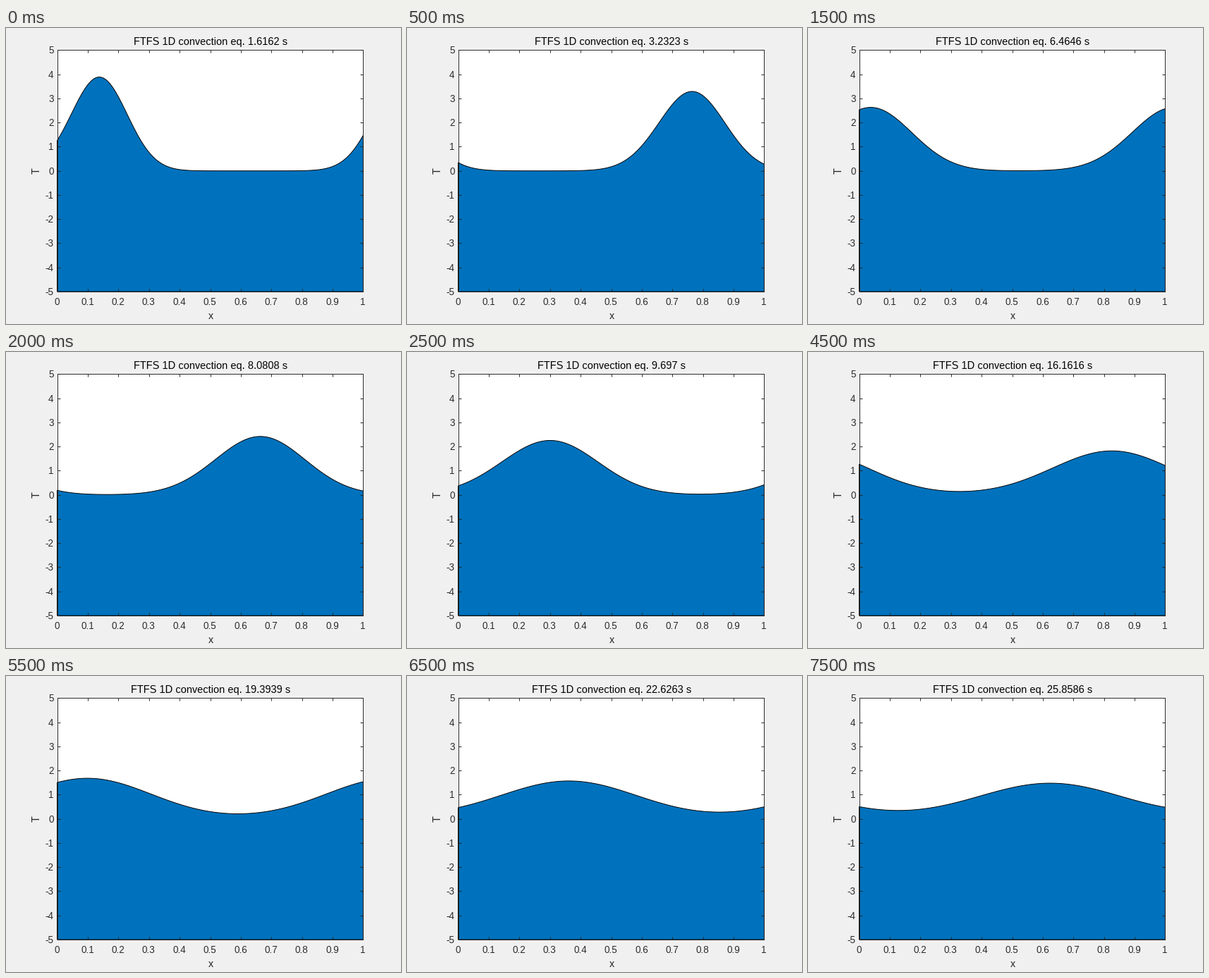
A matplotlib script that plays this animation: 560 px wide and 420 px high, repeating every 8000 ms.

```python
import numpy as np
import matplotlib.pyplot as plt
from matplotlib.animation import FuncAnimation

W, H, DPI = 560, 420, 96
FRAMES, INTERVAL = 16, 500
INK = "#262626"
LEFT, RIGHT, TOP, BOTTOM = 72.6, 506.4, 31.4, 374  # axes box in pixels
LINE = 0.72  # points, about one pixel

# Upwind scheme for dT/dt + dT/dx = 0 on 100 nodes, periodic over 98 cells
NODES = 100
PERIOD = NODES - 2
CFL = 0.8
STEPS = 200  # time steps per picture
x = np.linspace(0, 1, NODES)
dt = CFL * x[1]


def solve():
    T = 5 * np.exp(-100 * (x[:PERIOD] - 0.5) ** 2)
    states = []
    for _ in range(FRAMES):
        for _ in range(STEPS):
            T = T - CFL * (T - np.roll(T, 1))
        states.append(np.append(T, T[:2]))
    return states


states = solve()

plt.rcParams.update({
    "font.family": "Liberation Sans",
    "text.hinting": "native",
})
fig = plt.figure(figsize=(W / DPI, H / DPI), dpi=DPI, facecolor="#f0f0f0")
ax = fig.add_axes([LEFT / W, 1 - BOTTOM / H,
                   (RIGHT - LEFT) / W, (BOTTOM - TOP) / H])
ax.set(xlim=(0, 1), ylim=(-5, 5))
ax.set_axisbelow(False)
ax.tick_params(direction="in", top=True, right=True, length=3.3, width=LINE,
               color=INK, labelleft=False, labelbottom=False)
for spine in ax.spines.values():
    spine.set(color=INK, linewidth=LINE)


def label(px, py, text, size=11, color=INK, ha="center", va="baseline", **kw):
    return fig.text(px / W, 1 - py / H, text, size=size, color=color,
                    ha=ha, va=va, **kw)


ax.set_xticks(np.arange(11) / 10)
ax.set_yticks(np.arange(-5, 6))
for k in range(11):
    px = LEFT + (RIGHT - LEFT) * k / 10
    py = BOTTOM - (BOTTOM - TOP) * k / 10
    label(px - 0.4, 393, f"{k / 10:g}", size=10)
    label(67.5, py + 5, str(k - 5), size=10, ha="right")

label(290, 413, "x")
label(44, 202.5, "T", va="center", rotation=90)
title = label(290, 24, "", color="black")

area, = ax.fill([0, 1, 1], [-5, -5, 0], facecolor="#0072bd",
                edgecolor="black", linewidth=LINE, zorder=2, clip_on=False)


def update(i):
    xs = np.concatenate(([0], x, [1]))
    ys = np.concatenate(([-5], states[i], [-5]))
    area.set_xy(np.column_stack((xs, ys)))
    t = (i + 1) * STEPS * dt
    clock = f"{t:.4f}".rstrip("0").rstrip(".")
    title.set_text(f"FTFS 1D convection eq. {clock} s")
    return area, title


anim = FuncAnimation(fig, update, frames=FRAMES, interval=INTERVAL,
                     repeat=True, repeat_delay=0, blit=False)
plt.show()
```
